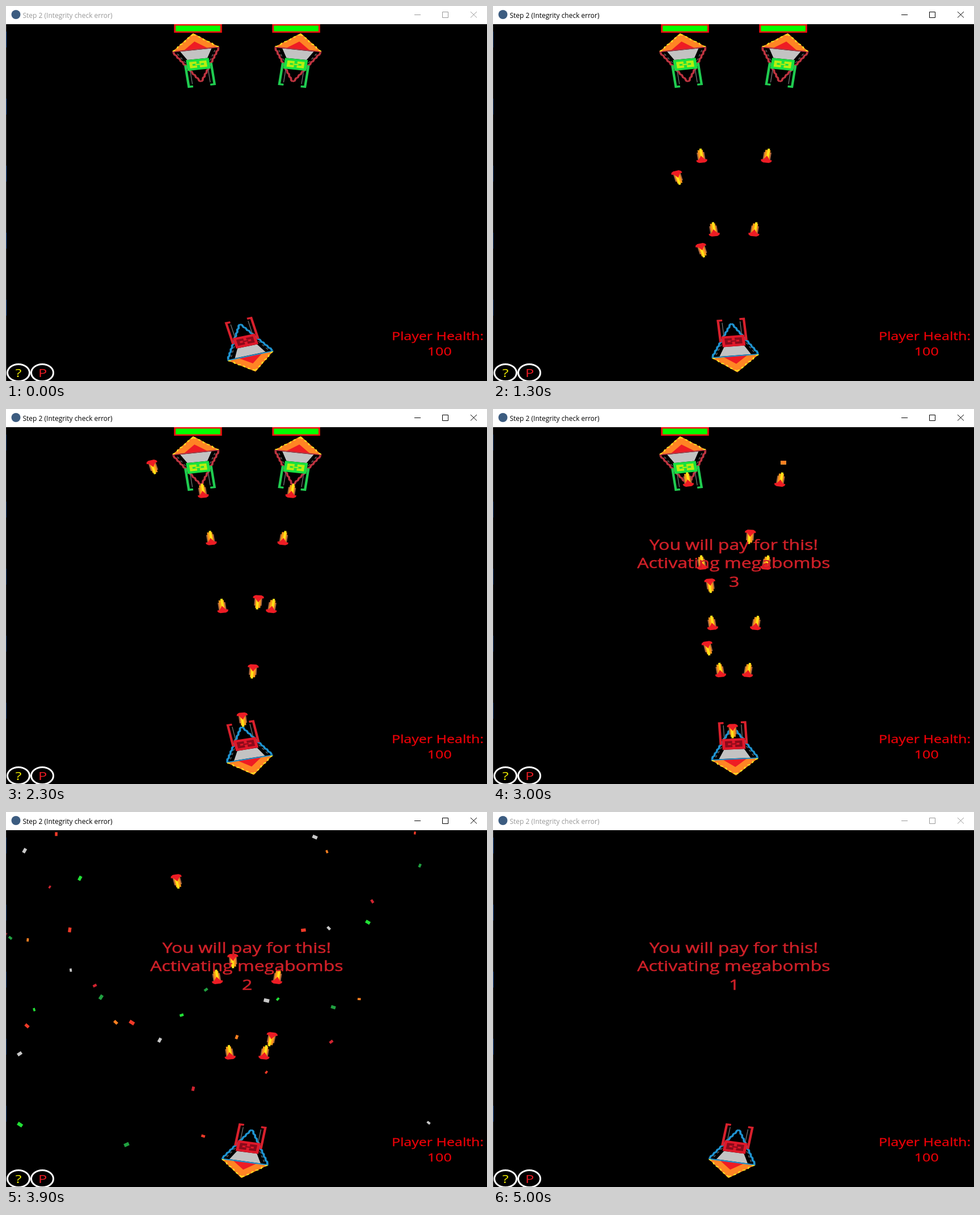
Recreate the animation shown at these times as an HTML page with a canvas. Size 848 by 660 pixels, loop 5.1 s.

```html
<!DOCTYPE html>
<html lang="en">
<head>
<meta charset="utf-8">
<title>Space duel</title>
<style>
  html, body { margin: 0; width: 100%; height: 100%; overflow: hidden; background: #000; }
  canvas, svg { position: absolute; left: 0; top: 0; display: block; }
  text { font-family: "Open Sans", "Noto Sans", sans-serif; }
  .wide { transform: scaleX(1.27); }
  .mid { text-anchor: middle; }
  #chrome { color: #000; }
  #chrome.idle { color: #999; }
  #chrome path { fill: none; stroke: currentColor; }
  #warning { fill: #cf2028; stroke: #cf2028; stroke-width: .5; font-size: 25.2px; }
  .health { fill: #ee0008; stroke: #ee0008; stroke-width: .25; font-size: 19.7px; }
</style>
</head>
<body>
<canvas id="field" width="848" height="660"></canvas>
<svg width="848" height="660" viewBox="0 0 848 660">
  <g fill="none" stroke="#fff" stroke-width="3">
    <ellipse cx="22" cy="645.5" rx="19.5" ry="15"/>
    <ellipse cx="64" cy="645.5" rx="19.5" ry="15"/>
  </g>
  <g class="wide mid" font-size="20">
    <text x="17.2" y="653" fill="#f4f000">?</text>
    <text x="51" y="653" fill="#ed1c24">P</text>
  </g>
  <g class="wide mid health">
    <text x="599.2" y="588">Player Health:</text>
    <text x="601.8" y="615">100</text>
  </g>
  <g id="warning" class="wide mid">
    <text x="334.2" y="248">You will pay for this!</text>
    <text x="334.2" y="280.5">Activating megabombs</text>
    <text id="count" x="334.8" y="313.3">3</text>
  </g>
  <g id="chrome">
    <rect width="848" height="32" fill="#fff"/>
    <circle cx="17.5" cy="15" r="8" fill="#3c5c80"/>
    <text x="29.5" y="20.5" font-size="12" fill="currentColor">Step 2 (Integrity check error)</text>
    <path d="M720 15.5H731M769.5 10.5H779.5V20.5H769.5ZM819 10L830 20.5M830 10L819 20.5"/>
  </g>
  <g id="edge">
    <path d="M.5 32V660" stroke="#3a3a3a"/>
    <path d="M.5 45V600" stroke="#2d5c9e" stroke-dasharray="28 90"/>
  </g>
</svg>
<script>
const $ = id => document.getElementById(id);
const g = $('field').getContext('2d');
const W = 848, H = 660, LOOP = 5100, STEP = 100;
const SX = 1.27; // the whole world is stretched sideways
const RAD = Math.PI / 180;
const OVER = 50; // the step when the window loses focus

const PLAYER = { x: 425, y: 598, wing: '#1f93d0', gun: '#d8202c', box: '#e0182a', core: '#8a0a1a' };
const ENEMY = { wing: '#bd3440', gun: '#20cc50', box: '#18e040', core: '#b8ee10' };
const DEBRIS = ['#20a040', '#d02430', '#22e036', '#c8c8c8', '#f03a28', '#ff8020'];

// Times of the volleys, in steps: all three ships fire together
const VOLLEYS = [4.9, 8.8, 16.3, 19.9, 22.4, 25.6, 30, 34];
const ENEMY_SPEED = 33.2, PLAYER_SPEED = 33.9;

// Player heading in degrees at a few steps
const TURNS = [[0, -14.7], [10, -14.7], [16, 3.4], [20, 3.4], [23, -11.5],
  [26, -11.5], [30, -3.3], [34, 9.6], [99, 9.6]];

let seed = 7;
const rand = (a = 0, b = 1) => a + (b - a) * ((seed = seed * 16807 % 2147483647) / 2147483647);

function makeEnemy(x, side, dies, count) {
  const bits = Array.from({ length: count }, (_, i) => {
    const angle = (i + rand()) / count * Math.PI * 2, speed = rand(52, 102);
    return {
      color: DEBRIS[i % DEBRIS.length], w: rand(5, 10), spin: rand(-.5, .5),
      vx: Math.cos(angle) * speed, vy: Math.sin(angle) * speed
    };
  });
  return { x, y: 94.3, side, dies, bits };
}
const ENEMIES = [makeEnemy(337.5, 1, 35, 54), makeEnemy(512, -1, 30, 54)];

function trace(pts) {
  g.beginPath();
  for (let i = 0; i < pts.length; i += 2) g.lineTo(pts[i], pts[i + 1]);
}
function poly(color, pts) {
  g.fillStyle = color;
  trace(pts);
  g.fill();
}
function line(color, width, pts) {
  g.strokeStyle = color;
  g.lineWidth = width;
  trace(pts);
  g.stroke();
}
function box(color, x, y, w, h) {
  g.fillStyle = color;
  g.fillRect(x, y, w, h);
}
function stairs(x0, y0, x1, y1, n) {
  const pts = [x0, y0], dx = (x1 - x0) / n, dy = (y1 - y0) / n;
  for (let i = 1; i <= n; i++) {
    const x = x0 + dx * i, y = y0 + dy * i;
    pts.push(x - dx * .3, y - dy * .7, x, y);
  }
  return pts;
}
function place(x, y, angle, draw) {
  g.save();
  g.translate(x, y);
  g.scale(SX, 1);
  g.rotate(angle);
  draw();
  g.restore();
}

function ship(x, y, deg, c) {
  place(x, y, deg * RAD, () => {
    poly('#ff8424', [-33, 18, 0, 47, 33, 18]);
    poly('#ee1c24', [-17, 18, 0, 32, 17, 18]);
    poly('#c3c3c3', [-14, 1, 14, 1, 22, 17, -22, 17]);
    line(c.wing, 1.8, [-33, 18, 33, 18]);
    for (const side of [-1, 1]) {
      g.save();
      g.scale(side, 1);
      g.setLineDash([4, 4]);
      line('#ffe020', 2, stairs(32, 19, 0, 46, 8));
      line('#777', 1, [17, -4, 27, 15]);
      g.setLineDash([]);
      line(c.wing, 3, stairs(0, -39, 31.5, 17, 9));
      line('#777', 1, [12.5, -42, 12.5, -13]);
      line(c.gun, 3.4, [12, -46, 18, -46, 18, -8]);
      g.restore();
    }
    box(c.box, -16, -18, 32, 19);
    box(c.core, -12, -14, 10, 11);
    box(c.core, 2, -14, 10, 11);
    box(c.box, -8, -10, 6, 3);
    box(c.box, 2, -10, 6, 3);
    box(c.core, -4, -9.5, 8, 2);
  });
}

function bullet(x, y, vx, vy) {
  place(x, y, Math.atan2(vx / SX, -vy), () => {
    box('#a8643c', -5.3, -8, 10.6, 14);
    box('#ff9a18', -3.6, -8, 7.2, 18);
    box('#ffe318', -2.4, -4, 3.2, 16.5);
    poly('#ee1c24', [-7.8, -7.5, -7, -10.5, -4, -12.5, 4, -12.5, 7, -10.5, 7.8, -7.5, 4, -6.5, 0, 0, -4, -6.5]);
  });
}

function enemy(e, n) {
  const k = n - e.dies;
  if (k < 0) {
    ship(e.x, e.y, 180 - 7.4 * e.side, ENEMY);
    const x = e.x - 41 + e.side * .7;
    box('#f01010', x - 1, 32, 84.5, 15);
    box('#00ff00', x + 2, 34.5, 78.5, 10);
    return;
  }
  for (const b of e.bits) {
    g.save();
    g.translate(e.x + b.vx * k, e.y + b.vy * k);
    g.rotate(b.spin * k);
    box(b.color, -b.w / 2, -b.w / 3, b.w, b.w * .66);
    g.restore();
  }
}

function heading(n) {
  const i = TURNS.findIndex(p => p[0] > n);
  const [a, from] = TURNS[i - 1], [b, to] = TURNS[i];
  return from + (to - from) * (n - a) / (b - a);
}

function volley(start, n) {
  if (n < Math.round(start) || n >= OVER) return;
  const y = 124 + ENEMY_SPEED * (n - start);
  for (const side of [1, -1]) {
    const slope = .17 * side;
    if (y < 566) bullet(425 - 82 * side + slope * (y - 124), y, slope, 1);
  }

  const angle = heading(Math.round(start)) * RAD;
  const vx = Math.sin(angle) * PLAYER_SPEED * SX, vy = -Math.cos(angle) * PLAYER_SPEED;
  const at = step => [PLAYER.x + vx * (step - start + .92), PLAYER.y + vy * (step - start + .92)];
  const hit = ENEMIES.some(e => {
    const [hx, hy] = at(e.dies);
    return n >= e.dies && Math.abs(hx - e.x) < 60 && Math.abs(hy - e.y) < 50;
  });
  if (!hit) bullet(...at(n), vx, vy);
}

function render(n) {
  box('#000', 0, 0, W, H);
  ENEMIES.forEach(e => enemy(e, n));
  ship(PLAYER.x, PLAYER.y, heading(n), PLAYER);
  VOLLEYS.forEach(start => volley(start, n));
  const idle = n < 2 || n >= OVER;
  $('chrome').classList.toggle('idle', idle);
  $('edge').style.opacity = idle ? 1 : .7;
  $('warning').style.display = n < 30 ? 'none' : '';
  $('count').textContent = 3 - Math.floor(Math.max(0, n - 29) / 10);
}

const begin = performance.now();
let last = -1;
function tick() {
  const n = Math.floor((performance.now() - begin) % LOOP / STEP);
  if (n !== last) render(last = n);
  requestAnimationFrame(tick);
}
tick();
</script>
</body>
</html>
```
